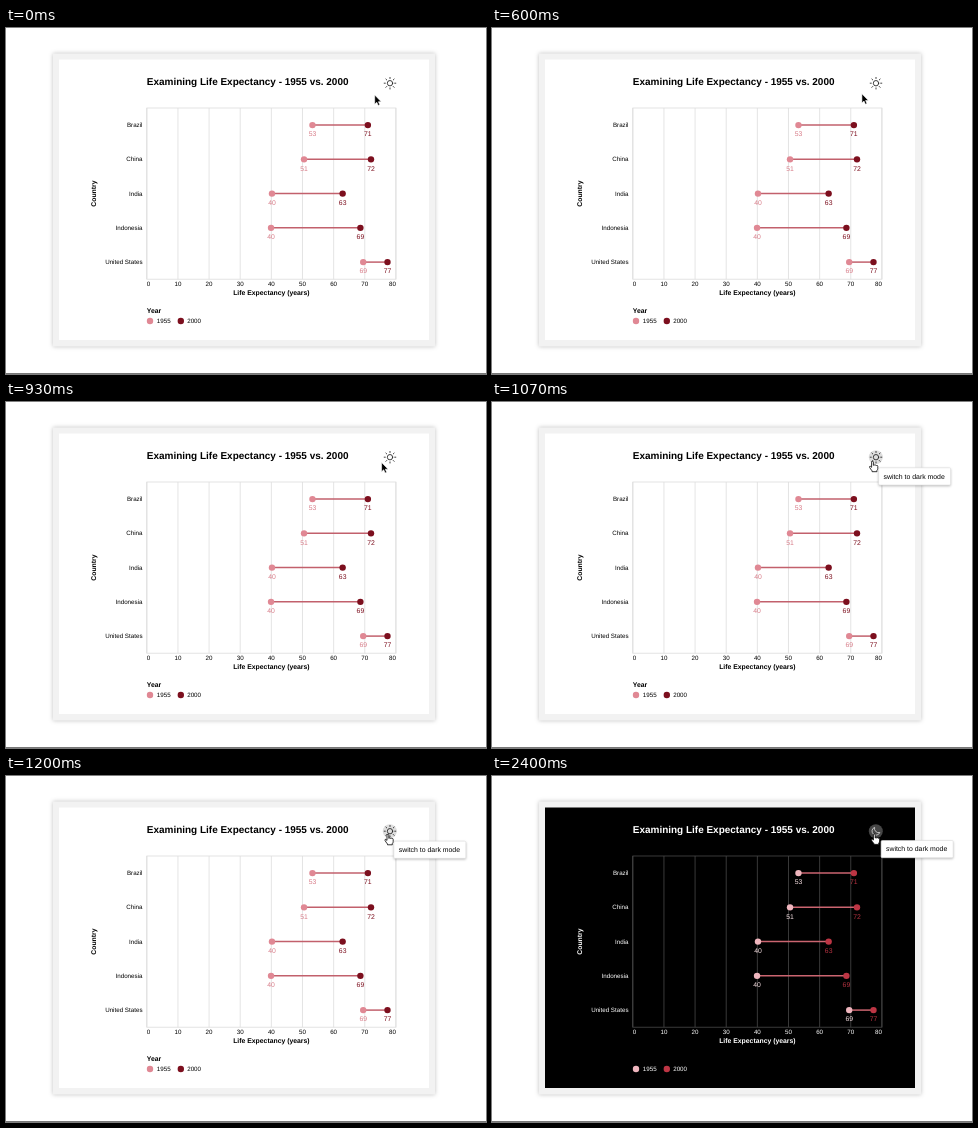
Recreate the animation shown at these times as an HTML page. Size 480 by 346 pixels, loop 5.39 s.

```html
<!DOCTYPE html>
<html lang="en">
<head>
<meta charset="utf-8">
<title>Examining Life Expectancy</title>
<style>
  html, body { margin: 0; height: 100%; overflow: hidden; background: #fff; }
  svg {
    display: block; width: 100vw; height: 100vh;
    font: 6.23px "Liberation Sans", Arial, sans-serif;
    text-rendering: geometricPrecision;
    --bg: #fff; --ink: #000; --grid: #ddd; --old: #e08894; --new: #7c0f1e;
    --link: #c2606c; --oldText: #d87d89; --newText: #7c0f1e; --hover: #dedede;
  }
  svg.dark {
    --bg: #000; --ink: #fff; --grid: #484848; --old: #efb6be; --new: #bd3544;
    --link: #cb6570; --oldText: #f6dfe2; --newText: #b43240; --hover: #464646;
  }
  .card { fill: #f2f2f2; filter: drop-shadow(0 0 2px rgba(0, 0, 0, .25)); }
  .bg { fill: var(--bg); }
  text { fill: var(--ink); }
  .bold { font-weight: bold; font-size: 6.85px; }
  .title { font-weight: bold; font-size: 9.97px; }
  .value { font-size: 6.85px; }
  .mid { text-anchor: middle; }
  .end { text-anchor: end; }
  .grid { stroke: var(--grid); stroke-width: .8; fill: none; }
  .link { stroke: var(--link); stroke-width: 1.5; }
  .old { fill: var(--old); }
  .new { fill: var(--new); }
  .oldText { fill: var(--oldText); }
  .newText { fill: var(--newText); }
  #hover { fill: var(--hover); }
  #sun { fill: none; stroke: #222; stroke-width: .85; stroke-linecap: round; }
  #moon { fill: none; stroke: #ddd; stroke-width: .8; stroke-linejoin: round; }
  .dark #sun, .dark .yearTitle, svg:not(.dark) #moon { display: none; }
  #tip rect { fill: #fff; stroke: #ddd; stroke-width: .6; filter: drop-shadow(.6px 1px 1.2px rgba(0, 0, 0, .25)); }
  #tip text { fill: #000; font-size: 6.9px; }
</style>
</head>
<body>
<svg id="stage" viewBox="0 0 480 346">
  <rect class="card" x="47" y="25.5" width="382" height="293"/>
  <rect class="bg" x="53" y="31.5" width="370" height="280.5"/>
  <rect y="345" width="480" height="1" fill="#777"/>
  <g id="chart"></g>
  <circle id="hover" cx="383.8" cy="55.2" r="7"/>
  <g id="sun" transform="translate(384 55.2)"><circle r="2.7"/></g>
  <path id="moon" d="M382.6 51.4a4 4 0 1 0 5.2 5.1a4.2 4.2 0 0 1-5.2-5.1z"/>
  <g id="tip">
    <rect width="72" height="17.2" rx="1.2"/>
    <text x="4.9" y="10.8">switch to dark mode</text>
  </g>
  <path id="arrow" d="M0 0V9.2L2.1 7.3 3.5 10.5 5.1 9.8 3.7 6.7H6.5z" fill="#000" stroke="#fff" stroke-width=".6"/>
  <path id="hand" d="M-1 .9a.9.9 0 0 1 1.8 0V4q.8-.9 1.6 0q.9-.7 1.5.2q1.2-.4 1.3.8V7q0 1.2-.9 2.2v1.2H-.5V9.6Q-2.2 7.6-3 6q-.3-1.2.8-1L-1 6z" fill="#fff" stroke="#000" stroke-width=".8" stroke-linejoin="round"/>
</svg>
<script>
const $ = id => document.getElementById(id);
const stage = $("stage"), chart = $("chart");

function add(parent, tag, attrs, text = "") {
  const el = document.createElementNS("http://www.w3.org/2000/svg", tag);
  for (const key in attrs) el.setAttribute(key, attrs[key]);
  el.textContent = text;
  parent.append(el);
  return el;
}
const label = (text, x, y, cls = "", more = {}) => add(chart, "text", { x, y, class: cls, ...more }, text);
const dot = (cx, cy, cls) => add(chart, "circle", { cx, cy, r: 3.2, class: cls });

const left = 140.8, right = 389.9, top0 = 80, bottom = 251.2;
const px = years => left + (right - left) * years / 80;

label("Examining Life Expectancy - 1955 vs. 2000", left, 56.8, "title");
add(chart, "rect", { x: left, y: top0, width: right - left, height: bottom - top0, class: "grid" });
for (let v = 0; v <= 80; v += 10) {
  add(chart, "path", { d: `M${px(v)} ${top0}V${bottom}`, class: "grid" });
  label(v, px(v), 258, v == 0 ? "" : v == 80 ? "end" : "mid");
}

const rows = [
  ["Brazil", 53.2, 71], ["China", 50.5, 72], ["India", 40.2, 62.9],
  ["Indonesia", 39.9, 68.6], ["United States", 69.5, 77.3]
];
const shown = [[53, 71], [51, 72], [40, 63], [40, 69], [69, 77]];
rows.forEach(([name, from, to], i) => {
  const y = 97.1 + 34.25 * i, a = px(from), b = px(to);
  label(name, 136.5, y + 2.1, "end");
  add(chart, "path", { d: `M${a} ${y}H${b}`, class: "link" });
  dot(a, y, "old");
  dot(b, y, "new");
  label(shown[i][0], a, y + 11.2, "value mid oldText");
  label(shown[i][1], b, y + 11.2, "value mid newText");
});

label("Life Expectancy (years)", 265.4, 267.2, "bold mid");
label("Country", 0, 0, "bold mid", { transform: "translate(90 165.6) rotate(-90)" });
label("Year", left, 284.9, "bold yearTitle");
dot(144, 293, "old");
label("1955", 150.8, 295.2);
dot(174.8, 293, "new");
label("2000", 181.2, 295.2);

for (let a = 0; a < 360; a += 45)
  add($("sun"), "path", { d: "M4.7 0H5.8", transform: `rotate(${a})` });

// Pointer stops: time, x, y
const stops = [
  [0, 368.7, 67], [470, 369, 67], [530, 369.3, 66.6], [600, 369.9, 65.8],
  [670, 370.8, 64.8], [730, 371.7, 63.7], [800, 372.8, 62.7], [870, 374.2, 61.5],
  [930, 375.6, 60.5], [1000, 378, 59.7], [1070, 380.6, 59.3], [1130, 381.4, 59],
  [1200, 382, 58.4], [1270, 382.4, 58]
];
const place = (el, x, y) => el.setAttribute("transform", `translate(${x} ${y})`);
const show = (el, on) => el.style.display = on ? "" : "none";

function draw(now) {
  const t = now % 5390;
  const [at, x, y] = stops.findLast(s => s[0] <= t);
  const over = at >= 1070;
  stage.classList.toggle("dark", t >= 2400);
  place($("arrow"), x, y);
  place($("hand"), x, y);
  const k = Math.max(0, (at - 1130) / 140);
  place($("tip"), 386.6 + 2.5 * k, 65.8 - 1.3 * k);
  show($("arrow"), !over);
  for (const id of ["hand", "tip", "hover"]) show($(id), over);
}

const start = performance.now();
function tick() {
  draw(performance.now() - start);
  requestAnimationFrame(tick);
}
tick();
</script>
</body>
</html>
```
